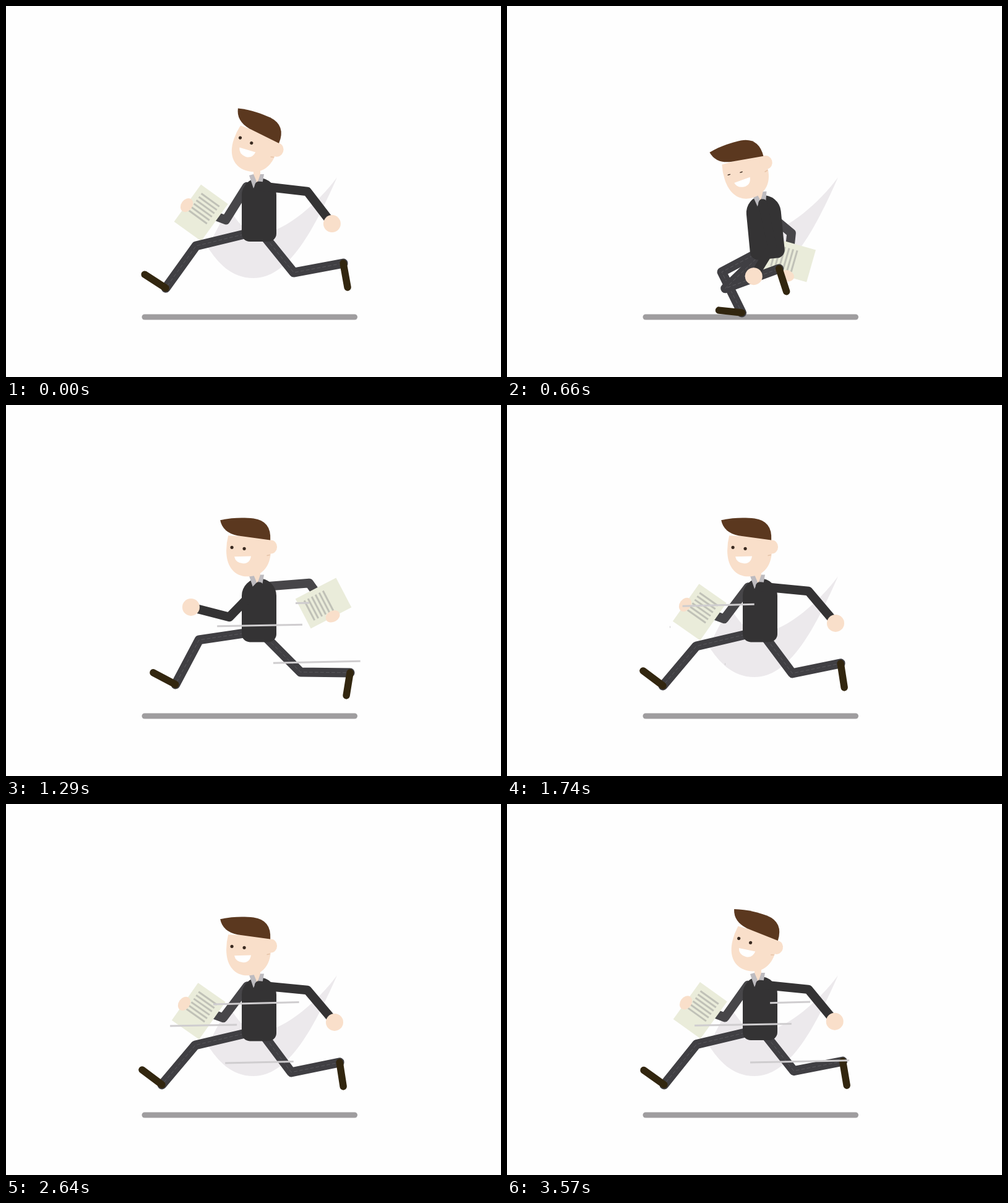
Write an HTML page with a canvas that moves like this. It is 800 px wide and 600 px high and loops after 3600 ms.

```html
<!DOCTYPE html>
<html lang="en">
<head>
<meta charset="utf-8">
<title>Running clerk</title>
<style>
  html, body { margin: 0; width: 100%; height: 100%; overflow: hidden; background: #fefefe; }
  canvas { display: block; }
</style>
</head>
<body>
<canvas id="stage" width="800" height="600"></canvas>
<script>
const ctx = document.getElementById('stage').getContext('2d');
const LOOP = 3600, CYCLE = 900, STEP = 450, BURST = 780;
const SKIN = '#f9dfca', SUIT = '#343334', LEG = '#403f43', FAR = '#474649', SHOE = '#32260f';
const RAD = Math.PI / 180;
const clamp = x => Math.min(1, Math.max(0, x));

// Periodic monotone cubic through the given keys.
function curve(times, values, period) {
  const n = times.length;
  const gap = times.map((t, i) => (i + 1 < n ? times[i + 1] : times[0] + period) - t);
  const slope = values.map((v, i) => (values[(i + 1) % n] - v) / gap[i]);
  const tangent = slope.map((s, i) => {
    const before = slope[(i + n - 1) % n];
    return s * before > 0 ? 2 * s * before / (s + before) : 0;
  });
  return time => {
    const t = time % period;
    let i = n - 1;
    while (times[i] > t) i--;
    const j = (i + 1) % n, u = (t - times[i]) / gap[i], w = 1 - u;
    return values[i] * w * w * (1 + 2 * u) + values[j] * u * u * (3 - 2 * u)
      + gap[i] * u * w * (tangent[i] * w - tangent[j] * u);
  };
}

const stepKeys = [0, 30, 210, 390, 420];
const body = {
  x: curve(stepKeys, [409, 409, 422, 409, 409], STEP),
  y: curve(stepKeys, [381, 381, 409, 383.5, 382], STEP),
  lean: curve(stepKeys, [0, 0, -5.5, 0, 0], STEP),
  head: curve(stepKeys, [19, 18.3, -12.1, 0, 14], STEP),
  eyes: curve(stepKeys, [1, 1, 0.3, 1, 1], STEP)
};

function onBody(t, x, y) {
  const a = body.lean(t) * RAD, c = Math.cos(a), s = Math.sin(a);
  return [body.x(t) + x * c - y * s, body.y(t) + x * s + y * c];
}
const hip = t => onBody(t, 1, -18);
const nearShoulder = t => onBody(t, 0, -90);
const farShoulder = t => onBody(t, -10 - 10 * Math.cos(2 * Math.PI * t / CYCLE), -89);

// Turns joint positions at each key into angle and length curves.
const poseKeys = [0, 210, 390, 480, 660, 840];
function limb(root, poses) {
  const bones = [];
  for (let b = 0; b < poses[0].length; b += 2) {
    const angles = [], lengths = [];
    poses.forEach((p, k) => {
      const [x, y] = b ? [p[b - 2], p[b - 1]] : root(poseKeys[k]);
      let a = Math.atan2(p[b + 1] - y, p[b] - x) / RAD;
      if (k) a += 360 * Math.round((angles[k - 1] - a) / 360);
      angles.push(a);
      lengths.push(Math.hypot(p[b] - x, p[b + 1] - y));
    });
    bones.push({ angle: curve(poseKeys, angles, CYCLE), length: curve(poseKeys, lengths, CYCLE) });
  }
  return t => {
    let [x, y] = root(t);
    const joints = [[x, y]];
    for (const bone of bones) {
      const a = bone.angle(t) * RAD, l = bone.length(t);
      joints.push([x += l * Math.cos(a), y += l * Math.sin(a)]);
    }
    return joints;
  };
}

const planted = [347, 430, 379, 496, 342, 492];
const swinging = [353, 457, 440, 425, 452, 462];
const nearLeg = limb(hip, [
  [307, 388, 258, 456, 224, 434], planted,
  [476, 432, 556, 433, 550, 470], [476, 428, 559, 429, 553, 468],
  swinging, [306, 390, 252, 454, 220, 430]
]);
const farLeg = limb(hip, [
  [465, 431, 545, 416, 552, 455], swinging,
  [312, 380, 274, 452, 238, 433], [312, 389, 269, 463, 234, 441],
  planted, [461, 434, 539, 418, 545, 457]
]);
const nearArm = limb(nearShoulder, [
  [487, 300, 527, 352], [432, 388, 402, 438], [361, 343, 299, 327],
  [360, 340, 297, 324], [428, 389, 398, 437], [487, 301, 531, 353]
]);
const farArm = limb(farShoulder, [
  [355, 346, 292, 322], [430, 385, 402, 438], [490, 288, 528, 342],
  [489, 285, 531, 338], [460, 367, 453, 436], [351, 346, 288, 323]
]);

function stroke(points, color, width, dash = []) {
  ctx.beginPath();
  points.forEach(p => ctx.lineTo(...p));
  ctx.strokeStyle = color;
  ctx.lineWidth = width;
  ctx.setLineDash(dash);
  ctx.stroke();
}
function fill(path, color) {
  ctx.fillStyle = color;
  ctx.fill(new Path2D(path));
}
function oval(x, y, rx, ry, color) {
  ctx.beginPath();
  ctx.ellipse(x, y, rx, ry, 0, 0, 2 * Math.PI);
  ctx.fillStyle = color;
  ctx.fill();
}
function group(x, y, degrees, draw) {
  ctx.save();
  ctx.translate(x, y);
  ctx.rotate(degrees * RAD);
  draw();
  ctx.restore();
}

function drawLeg([top, knee, ankle, toe]) {
  stroke([top, knee, ankle], LEG, 15);
  stroke([top, knee, ankle], '#58575b', 1, [5, 4]);
  stroke([ankle, toe], SHOE, 11.5);
}

function drawPaper([, elbow, hand]) {
  let forearm = Math.atan2(hand[1] - elbow[1], hand[0] - elbow[0]) / RAD;
  if (forearm < 0) forearm += 360;
  group(...hand, forearm * 1.05 + 5, () => {
    ctx.fillStyle = '#eaecda';
    ctx.fillRect(-53, -33.5, 54, 74);
    ctx.fillStyle = '#c0c1b7';
    for (let i = 0; i < 6; i++) ctx.fillRect(-44, -6.5 + i * 6.8, 36, 3);
    oval(0, 0, 9, 12, SKIN);
  });
}

// Trail of the papers, revealed by a wedge that follows the hand.
function drawTrail(phase, [, , hand]) {
  let from = -20, to = 185;
  if (phase < 150) from += 205 * (phase / 150) ** 2;
  else if (phase > 510) to = Math.atan2(hand[1] - 300, hand[0] - 409) / RAD;
  else return;
  if (to < -90) to += 360;
  ctx.save();
  ctx.beginPath();
  ctx.moveTo(409, 300);
  ctx.arc(409, 300, 400, from * RAD, to * RAD);
  ctx.clip();
  fill('M535 277C493 373 453 440 400 440C364 440 342 415 326 390L360 325C375 355 395 371 415 369C455 361 505 318 535 277Z', '#ece9ec');
  ctx.restore();
}

function drawHead(t) {
  fill('M-57-52Q-60-40-60-28C-60 0-45 14-26 14C-4 14 12 0 12-30L11-50Z', SKIN);
  oval(12, -34, 10, 11, SKIN);
  stroke([[6, -20], [10, -21]], '#e6c3a8', 1.5);
  fill('M-70-77C-48-82-30-81-16-80Q13-76 11-45L-42-52Q-66-57-70-77Z', '#5b381f');
  const open = 2.6 * body.eyes(t);
  oval(-51, -33, 2.6, open, '#3a2a20');
  oval(-31, -31, 2.6, open, '#3a2a20');
  fill('M-47-18L-20-19Q-22-7-33-7Q-45-8-47-18Z', '#fff');
}

function drawTorso() {
  ctx.beginPath();
  ctx.roundRect(-28, -103, 56, 103, [28, 28, 13, 13]);
  ctx.fillStyle = SUIT;
  ctx.fill();
  fill('M-9-124H2V-103L-4-95L-9-103Z', SKIN);
  fill('M-16-107L-9-109L-4-97L-9-86ZM2-109L8-109L4-86L-2-97Z', '#bdbbbf');
}

const speedLines = [
  { a: [258, 326], b: [490, 320], head: [55, 390], tail: [60, 540], power: 1.6 },
  { a: [263, 359], b: [491, 355], head: [180, 610], tail: [210, 640], power: 3 },
  { a: [352, 419], b: [585, 414], head: [180, 610], tail: [210, 640], power: 3 }
];
function drawSpeedLines(t) {
  const u = t % BURST;
  const part = ([start, end]) => clamp((u - start) / (end - start));
  ctx.lineCap = 'butt';
  for (const { a, b, head, tail, power } of speedLines) {
    const front = 1 - (1 - part(head)) ** 2, back = part(tail) ** power;
    if (front <= back) continue;
    const at = k => [a[0] + (b[0] - a[0]) * k, a[1] + (b[1] - a[1]) * k];
    stroke([at(back), at(front)], '#cfcdcf', 3);
  }
}

function draw(t) {
  const phase = t % CYCLE, near = nearArm(phase), far = farArm(phase);
  ctx.fillStyle = '#fefefe';
  ctx.fillRect(0, 0, 800, 600);
  ctx.lineCap = ctx.lineJoin = 'round';
  stroke([[224, 503], [563.5, 503]], '#9f9d9f', 9);
  drawTrail(phase, far);
  stroke(far, FAR, 14.5);
  drawPaper(far);
  drawLeg(farLeg(phase));
  drawLeg(nearLeg(phase));
  group(body.x(t), body.y(t), body.lean(t), drawTorso);
  stroke(near, SUIT, 14.5);
  oval(...near[2], 14, 14, SKIN);
  group(...onBody(t, 7, -120), body.lean(t) + body.head(t), () => drawHead(t));
  drawSpeedLines(t);
}

const start = performance.now();
function frame() {
  draw((performance.now() - start) % LOOP);
  requestAnimationFrame(frame);
}
frame();
</script>
</body>
</html>
```
